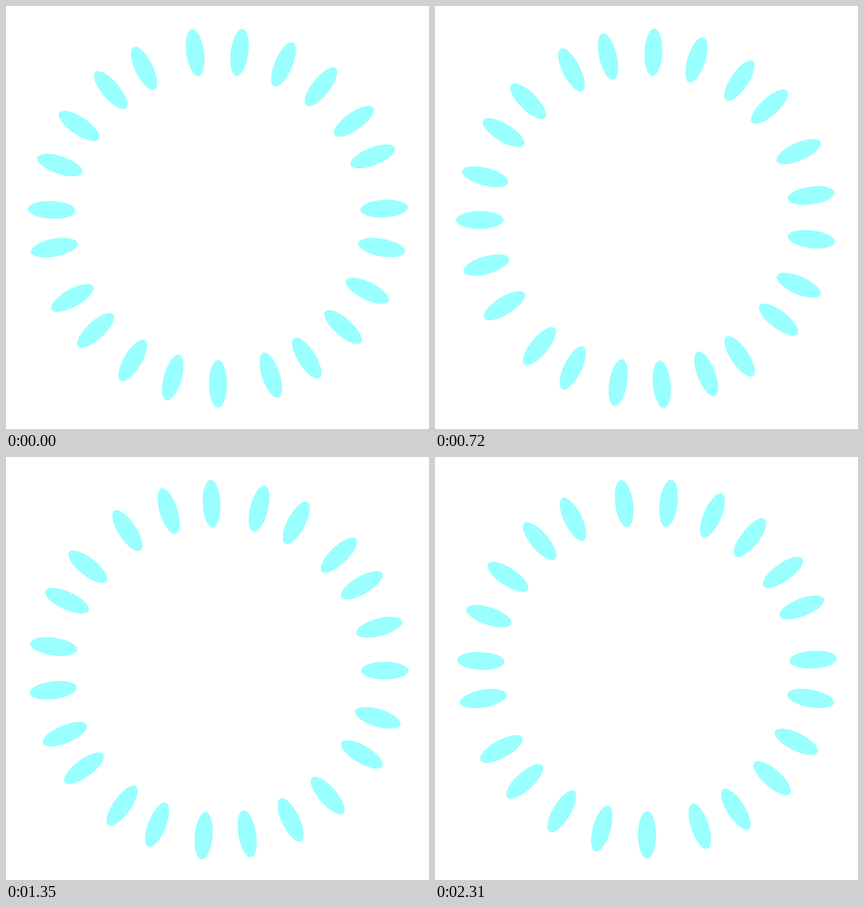
Animation, 748 px wide and 748 px high, one loop 2340 ms. Source, as an HTML page:

```html
<!DOCTYPE html>
<html lang="en">
<head>
<meta charset="utf-8">
<title>Rotating petals</title>
<style>
  html, body { margin: 0; width: 100%; height: 100%; overflow: hidden; background: #fff; }
  svg { display: block; width: 100vw; height: 100vh; }
</style>
</head>
<body>
<svg viewBox="0 0 748 748"><g id="ring" fill="#9ff"></g></svg>
<script>
  const STEP = 30, STEPS = 78;
  const PIVOT = { x: 374.8, y: 375.3 };
  const CENTER_Y = 373.85, RADIUS = 294.3;
  const ring = document.getElementById('ring');

  // Four copies of one six-petal arc; angles run clockwise from the top.
  const arcStarts = [7.45, 100.42, 180, 272.58];
  const petalOffsets = [0, 15.74, 30.8, 47.3, 61.05, 79.54];

  for (const start of arcStarts) {
    for (const offset of petalOffsets) {
      const petal = document.createElementNS('http://www.w3.org/2000/svg', 'ellipse');
      petal.setAttribute('cx', PIVOT.x);
      petal.setAttribute('cy', CENTER_Y - RADIUS);
      petal.setAttribute('rx', 15.7);
      petal.setAttribute('ry', 42);
      petal.setAttribute('transform', `rotate(${start + offset} ${PIVOT.x} ${CENTER_Y})`);
      ring.append(petal);
    }
  }

  // Three quarter turns of 19 steps, then one of 20.
  const angleAt = step => step <= 57 ? step * 90 / 19 : 270 + (step - 57) * 4.5;

  function draw(now) {
    const step = Math.floor(now / STEP) % STEPS;
    ring.setAttribute('transform', `rotate(${-angleAt(step)} ${PIVOT.x} ${PIVOT.y})`);
  }

  const begin = performance.now();
  function tick() {
    draw(performance.now() - begin);
    requestAnimationFrame(tick);
  }
  tick();
</script>
</body>
</html>
```
